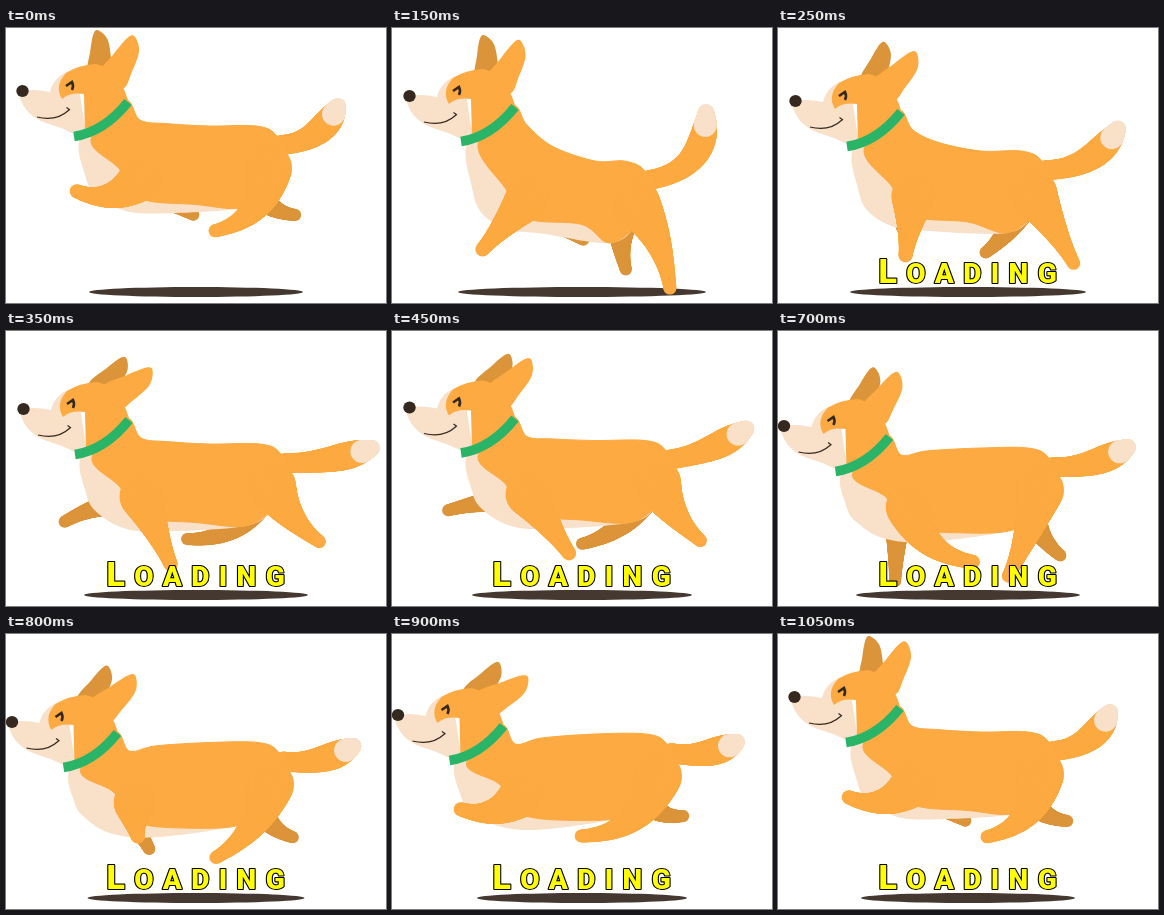
Animation, 380 px wide and 275 px high, one loop 1.1 s. Source, as an HTML page with a canvas:

```html
<!DOCTYPE html>
<html lang="en">
<head>
<meta charset="utf-8">
<title>Loading</title>
<style>
html, body { margin: 0; width: 100%; height: 100%; overflow: hidden; background: #fff; }
canvas, svg { position: absolute; left: 0; top: 0; }
text {
  font: 900 34px Roboto, sans-serif; letter-spacing: 9.4px;
  fill: #ff0; stroke: #000; stroke-width: 2.2px; stroke-linejoin: round; paint-order: stroke;
}
tspan { font-size: 28px; }
</style>
</head>
<body>
<canvas id="stage" width="380" height="275"></canvas>
<svg width="380" height="275"><text id="label" x="100.5" y="255">L<tspan>OADING</tspan></text></svg>
<script>
const LOOP = 1100, STEP = 50, TEXT_FROM = 250;
const ORANGE = '#fcaa41', DARK = '#dc943a', CREAM = '#f8e0c9', GREEN = '#29b468', INK = '#35291f';
const ctx = document.getElementById('stage').getContext('2d');
const label = document.getElementById('label');

// head: offset; ears: angles of far and near ear; rump: top of the hindquarters;
// tail and legs: end point and sideways bend; shadow: half its width.
const poses = [
  { time: 0, head: [0, 0], ears: [-93, -63], rump: [270, 103], tail: [332, 78, 20], shadow: [107],
    fore: [70, 163, -22], hind: [208, 203, -31], farFore: [188, 187, 0], farHind: [290, 187, 25] },
  { time: 150, head: [1, 5], ears: [-94, -64], rump: [252, 138], tail: [314, 84, 38], shadow: [124],
    fore: [90, 222, 0], hind: [278, 261, -12], farFore: [192, 212, 0], farHind: [234, 242, 8] },
  { time: 350, head: [1, 15], ears: [-50, -35], rump: [274, 118], tail: [366, 117, 8], shadow: [112],
    fore: [165, 234, 0], hind: [314, 211, 10], farFore: [58, 191, 8], farHind: [180, 208, -32] },
  { time: 550, head: [1, 12], ears: [-57, -62], rump: [272, 111], tail: [343, 78, 12], shadow: [108],
    fore: [190, 212, 0], hind: [304, 209, 8], farFore: [53, 168, 0], farHind: [198, 218, -15] },
  { time: 700, head: [-10.5, 32], ears: [-70, -59], rump: [270, 122], tail: [350, 116, 12], shadow: [112],
    fore: [196, 231, 27], hind: [230, 246, -5], farFore: [117, 251, 0], farHind: [283, 225, 15] },
  { time: 900, head: [-10.5, 18], ears: [-52, -32], rump: [274, 105], tail: [345, 108, 12], shadow: [105],
    fore: [68, 175, -20], hind: [188, 202, -36], farFore: [170, 180, 0], farHind: [292, 182, 28] }
];
poses.push({ ...poses[0], time: 1050 });

function poseAt(t) {
  const next = poses.findIndex(p => p.time > t);
  if (next < 0) return poses[0];
  const a = poses[next - 1], b = poses[next], u = (t - a.time) / (b.time - a.time);
  const mix = {};
  for (const k in a) if (k !== 'time') mix[k] = a[k].map((v, i) => v + (b[k][i] - v) * u);
  return mix;
}

// Closed smooth outline through the points.
function blob(points, color) {
  const n = points.length, at = i => points[(i + n) % n];
  ctx.beginPath();
  ctx.moveTo(...points[0]);
  points.forEach(([x1, y1], i) => {
    const [x0, y0] = at(i - 1), [x2, y2] = at(i + 1), [x3, y3] = at(i + 2);
    ctx.bezierCurveTo(x1 + (x2 - x0) / 6, y1 + (y2 - y0) / 6, x2 - (x3 - x1) / 6, y2 - (y3 - y1) / 6, x2, y2);
  });
  ctx.fillStyle = color;
  ctx.fill();
}

function oval(x, y, rx, ry, color) {
  ctx.beginPath();
  ctx.ellipse(x, y, rx, ry, 0, 0, 7);
  ctx.fillStyle = color;
  ctx.fill();
}

// Bent round limb; radius depends on the position u along it.
function limb([x0, y0], [x2, y2, bend], radius, color, from = 0) {
  const dx = x2 - x0, dy = y2 - y0, len = Math.hypot(dx, dy);
  const x1 = (x0 + x2) / 2 - dy / len * bend, y1 = (y0 + y2) / 2 + dx / len * bend;
  const curve = (a, b, c, u) => a * (1 - u) ** 2 + 2 * b * u * (1 - u) + c * u * u;
  for (let u = from; u <= 1; u += 0.01) {
    const r = radius(u);
    oval(curve(x0, x1, x2, u), curve(y0, y1, y2, u), r, r, color);
  }
}

const taper = (root, tip) => u => tip + (root - tip) * (1 - u) ** 1.5;
const brush = u => 10 + 5 * Math.sin(Math.PI * u ** 2) - 2 * u;

function ear(x, y, angle, size, color) {
  ctx.save();
  ctx.translate(x, y);
  ctx.rotate(angle * Math.PI / 180);
  ctx.scale(size, size);
  blob([[-5, -13], [24, -9], [44, -4], [47, 2], [36, 12], [14, 15], [-5, 14]], color);
  ctx.restore();
}

const fill = (d, color) => { ctx.fillStyle = color; ctx.fill(new Path2D(d)); };
function line(d, width, color = INK) {
  ctx.lineWidth = width;
  ctx.strokeStyle = color;
  ctx.stroke(new Path2D(d));
}

function drawHead({ head, ears }) {
  ctx.save();
  ctx.translate(...head);
  ear(93, 42, ears[0], 0.84, DARK);
  fill('M12 64Q26 60 44 64Q48 46 70 41L80 106L66 105Q54 99 40 95Q20 88 14 70Z', CREAM);
  fill('M60 45Q72 37 90 36Q112 40 122 72Q104 96 79 106L78 66Q64 64 56 71Q48 58 60 45Z', ORANGE);
  ear(106, 50, ears[1], 1, ORANGE);
  line('M68 108.5Q98 104 122 74', 9.5, GREEN);
  oval(16.5, 63, 6.2, 6, INK);
  line('M31 89Q50 94 63 82M60.5 79.5L64 82', 1.2);
  line('M60 58L66 54Q68 58 66 62', 2.6);
  ctx.restore();
}

function drawDog(p) {
  const [hx, hy] = p.head, [rx, ry] = p.rump;
  const nape = [119 + hx, 73 + hy], throat = [75 + hx, 108 + hy];
  const bellyY = 134 + (ry + hy) / 2;
  const shoulder = [135 + hx / 2, bellyY - 35], hip = [rx - 8, ry + 37];
  const withersY = nape[1] + 19;
  const groin = [rx - 35, ry + 77];
  const back = [
    nape, [nape[0] + 15, withersY], [nape[0] + 41, withersY + (ry - 5 - withersY) * 0.6],
    [203, ry - 5], [rx - 20, ry - 5], [rx, ry + 4], [rx + 9, ry + 30], [rx - 8, ry + 60], groin
  ];
  const chest = [
    [150, bellyY], [throat[0] + 40, bellyY - 4], [throat[0] + 14, bellyY - 20],
    [throat[0] + 4, (throat[1] + bellyY) / 2], throat
  ];
  const side = [
    [190, bellyY - 9], [shoulder[0], bellyY - 15], [shoulder[0] - 22, shoulder[1] - 10], [85 + hx, 112 + hy]
  ];

  limb([shoulder[0] - 10, shoulder[1] + 5], p.farFore, taper(15, 6), DARK);
  limb([hip[0] - 12, hip[1] + 5], p.farHind, taper(20, 6), DARK);
  const tailBase = [rx + 5, ry + 14];
  limb(tailBase, p.tail, brush, ORANGE);
  limb(tailBase, p.tail, brush, CREAM, 0.88);
  blob([...back, ...chest], CREAM);
  blob([...back, ...side], ORANGE);
  ctx.lineWidth = 1;
  ctx.strokeStyle = ORANGE;
  ctx.stroke();
  limb(hip, p.hind, taper(24, 6.5), ORANGE);
  limb(shoulder, p.fore, taper(22, 7), ORANGE);
  drawHead(p);
}

function draw(t) {
  const p = poseAt(t);
  ctx.clearRect(0, 0, 380, 275);
  oval(190, 264, p.shadow[0], 5, '#453830');
  drawDog(p);
  label.style.visibility = t < TEXT_FROM ? 'hidden' : 'visible';
}

const start = performance.now();
function tick() {
  const t = (performance.now() - start) % LOOP;
  draw(Math.floor(t / STEP) * STEP);
  requestAnimationFrame(tick);
}
tick();
</script>
</body>
</html>
```
